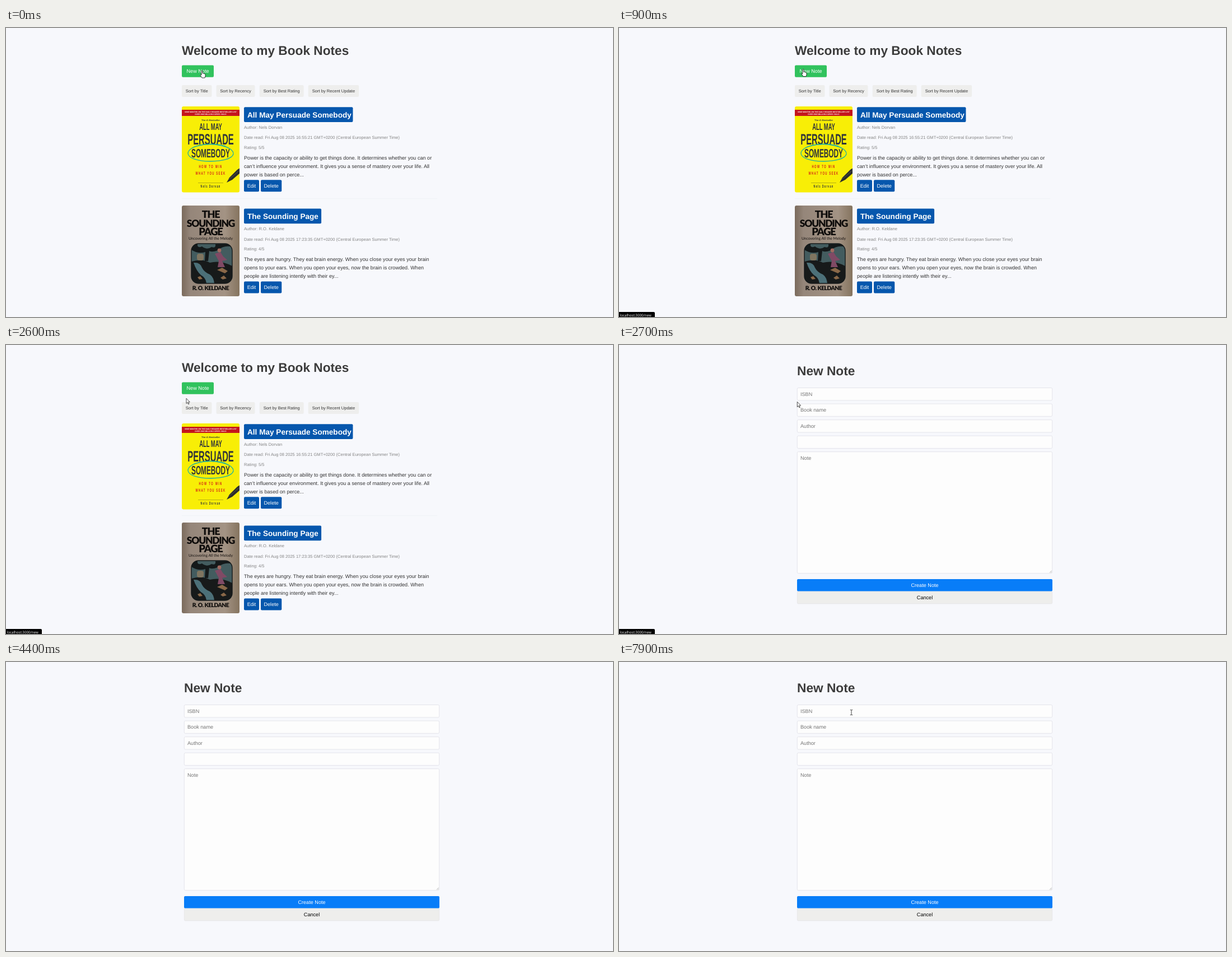
Write an HTML page that moves like this. It is 1084 px wide and 516 px high and loops after 8 s.

```html
<!DOCTYPE html>
<html lang="en">
<head>
<meta charset="utf-8">
<title>Book Notes</title>
<style>
  html, body { margin: 0; width: 100%; height: 100%; overflow: hidden; background: #f7f8fc; }
  svg { display: block; width: 100vw; height: 100vh; }
  text { font-family: "Liberation Sans", Arial, sans-serif; font-size: 9.12px; text-rendering: geometricPrecision; white-space: pre; }
  .heading { font-size: 22.7px; font-weight: 700; fill: #3c3c3c; }
  .title { font-size: 13.6px; font-weight: 700; fill: #fff; }
  .meta { font-size: 7.57px; fill: #858585; }
  .body { fill: #333; }
  .sort { font-size: 7.55px; fill: #333; }
  .light { fill: #fff; }
  .hint { fill: #757575; }
  .status { font: 6.2px "Open Sans", "Noto Sans", sans-serif; fill: #fff; }
  .mid { text-anchor: middle; }
  .tall { font-weight: 700; fill: #30343a; text-anchor: middle; }
  .black { font-family: Lato, Inter, sans-serif; font-weight: 900; fill: #0d0b0a; text-anchor: middle; }
</style>
</head>
<body>
<svg viewBox="0 0 1084 516" preserveAspectRatio="none">
  <defs>
    <linearGradient id="paper">
      <stop offset="0" stop-color="#7b6b5c"/>
      <stop offset=".15" stop-color="#95867a"/>
      <stop offset=".75" stop-color="#a39384"/>
      <stop offset="1" stop-color="#85745f"/>
    </linearGradient>
    <clipPath id="coverA"><rect x="314" y="140" width="103" height="153.5" rx="3"/></clipPath>
    <clipPath id="scene"><rect x="331" y="385" width="73" height="71" rx="13"/></clipPath>
  </defs>
  <rect width="1084" height="516" fill="#f7f8fc"/>
  <g id="home"></g>
  <g id="form"></g>
  <g id="status"></g>
  <g id="cursor">
    <path id="hand" fill="#fff" stroke="#222" stroke-width=".9" stroke-linejoin="round"
      d="M-1 1Q-1 0 0 0T1 1V5Q3 4 3.2 5.5Q4.8 5 5 6.3Q6 6 6 7.5V10L5 13H0L-3 8.5Q-3 7-1 8Z"/>
    <path id="arrow" fill="#fff" stroke="#222" stroke-width=".8" stroke-linejoin="round"
      d="M0 0V9.2L2.1 7.2L3.6 10.4L5 9.9L3.6 6.6H6.3Z"/>
    <path id="beam" fill="none" stroke="#333" stroke-width=".9"
      d="M-2.2-4.5H-.6L0-4L.6-4.5H2.2M0-4V4M-2.2 4.5H-.6L0 4L.6 4.5H2.2"/>
  </g>
</svg>
<script>
const $ = id => document.getElementById(id);
const rect = (x, y, w, h, fill, rx = 2, extra = '') =>
  `<rect x="${x}" y="${y}" width="${w}" height="${h}" rx="${rx}" fill="${fill}" ${extra}/>`;
const text = (x, y, cls, str, style = '') =>
  `<text x="${x}" y="${y}" class="${cls}" style="${style}">${str}</text>`;
const path = (d, fill, stroke = 'none', width = 1) =>
  `<path d="${d}" fill="${fill}" stroke="${stroke}" stroke-width="${width}"/>`;

// Narrow lettering: every line shares one condensed proportion.
const narrow = (y, size, str, fill = '#30343a', spacing = 0) =>
  `<g transform="translate(365.5 ${y}) scale(.55 1)">` +
  text(0, 0, 'tall', str, `font-size:${size}px;fill:${fill};letter-spacing:${spacing}px`) + '</g>';
const heavy = (y, size, str, spacing = -1.2) =>
  text(365.5, y, 'black', str, `font-size:${size}px;letter-spacing:${spacing}px`);

const yellowCover = () => `<g clip-path="url(#coverA)">` +
  rect(314, 140, 103, 154, '#f8ee06', 0) +
  rect(314, 146, 103, 11, '#c4161c', 0) +
  text(365.5, 150.8, 'mid light', 'NINE MONTHS ON THE DAILY READER BESTSELLER LIST', 'font-size:3.3px;font-weight:700') +
  text(365.5, 155, 'mid light', 'OVER ONE MILLION COPIES SOLD!', 'font-size:3.3px;font-weight:700') +
  text(365.5, 166, 'mid', 'The #1 Bestseller', 'font-size:4px;font-weight:700;fill:#30343a') +
  narrow(181.5, 17, 'ALL MAY') +
  narrow(207.5, 27, 'PERSUADE') +
  narrow(231, 21.5, 'SOMEBODY') +
  path('M392 211C360 202 325 211 325 224C326 242 402 243 406 225C407 211 368 203 341 211', 'none', '#1ab0a2', 1.3) +
  narrow(250, 8, 'HOW TO WIN', '#d32118', 2.6) +
  narrow(262, 8, 'WHAT YOU SEEK', '#d32118', 2.4) +
  path('M394 276L399 267L413 253L418 250V259L404 271Z', '#2b2d2c') +
  path('M397 271L416 255', 'none', '#6a6b5c', .6) +
  path('M343 276.5H388', 'none', '#8b861c', .6) +
  narrow(285, 7.4, 'Nels Dorvan', '#30343a', 2) + '</g>';

const tanCover = () => rect(314, 317, 103, 162, 'url(#paper)', 3) +
  heavy(339, 18, 'THE') + heavy(354.5, 17.4, 'SOUNDING') + heavy(369.5, 18.4, 'PAGE') +
  text(365.5, 378, 'mid', 'Uncovering All the Melody', 'font:6.8px Lato,sans-serif;fill:#15110f') +
  '<g clip-path="url(#scene)">' + rect(331, 385, 73, 71, '#435c5f', 0) +
  path('M331 385H342Q341 394 350 390Q359 397 367 391Q375 394 374 386L404 385V391Q390 387 378 397Q368 401 363 398L361 416H355L356 400Q343 404 331 396Z', '#14191a') +
  path('M331 417Q350 411 364 419Q384 414 404 425V456H331Z', '#171a1a') +
  path('M335 419Q347 418 350 428Q354 436 364 440Q371 445 372 456H358Q357 446 348 441Q340 434 335 419Z', '#4c7078') +
  rect(341, 403, 12, 12, '#7f7560', 4) +
  path('M373 403L383 400L388 408L395 414L386 416L391 427H378L380 416Z', '#804a65') +
  '<circle cx="381" cy="397" r="3.4" fill="#a26b61"/>' +
  path('M377 432L386 428L396 434L391 438Z', '#8a6848') +
  path('M342 445l5-2 4 5-6 1zM383 446l6-4 5 5-7 2z', '#8a6848') + '</g>' +
  rect(331, 385, 73, 71, 'none', 13, 'stroke="#14191a" stroke-width="1.4"') +
  heavy(467.8, 10.3, 'R. O. KELDANE', -.5);

function entry(top, title, width, author, date, rating, lines) {
  const button = (x, w, label) => rect(x, top + 130, w, 21, '#0657ad') +
    text(x + w / 2, top + 143.8, 'mid light', label);
  return rect(425, top, 194.5 * width, 26.7, '#0657ad') +
    text(431, top + 18.4, 'title', title) +
    text(425, top + 38.8, 'meta', 'Author: ' + author) +
    text(425, top + 57, 'meta', `Date read: Fri Aug 08 2025 ${date} GMT+0200 (Central European Summer Time)`) +
    text(425, top + 74.6, 'meta', `Rating: ${rating}/5`) +
    lines.map((line, i) => text(425, top + 93.8 + i * 14.85, 'body', line)).join('') +
    button(425, 27, 'Edit') + button(455, 37.3, 'Delete');
}

const sorts = [[314, 53.5, 'Title'], [375.5, 69, 'Recency'], [452.7, 79, 'Best Rating'], [539.7, 90.5, 'Recent Update']];
$('home').innerHTML =
  text(314, 48.3, 'heading', 'Welcome to my Book Notes') +
  rect(314, 66.5, 57, 21.3, '#31c25d') + text(342.5, 80.4, 'mid light', 'New Note') +
  sorts.map(([x, w, by]) => rect(x, 102, w, 21, '#eeeeed') +
    text(x + w / 2, 115.2, 'mid sort', 'Sort by ' + by)).join('') +
  yellowCover() + tanCover() +
  rect(314, 304.5, 456, .6, '#eceef3', 0) +
  entry(141.3, 'All May Persuade Somebody', 1, 'Nels Dorvan', '16:55:21', 5, [
    'Power is the capacity or ability to get things done. It determines whether you can or',
    'can’t influence your environment. It gives you a sense of mastery over your life. All',
    'power is based on perce...']) +
  entry(322.5, 'The Sounding Page', .71, 'R.O. Keldane', '17:23:35', 4, [
    'The eyes are hungry. They eat brain energy. When you close your eyes your brain',
    'opens to your ears. When you open your eyes, now the brain is crowded. When',
    'people are listening intently with their ey...']);

const field = (y, h, hint) =>
  rect(318.3, y + .3, 455.4, h - .6, '#fdfdfd', 2, 'stroke="#dcdce4" stroke-width=".7"') +
  text(324, y + 14.4, 'hint', hint);
$('form').innerHTML =
  text(318, 54.3, 'heading', 'New Note') +
  ['ISBN', 'Book name', 'Author', ''].map((hint, i) => field(76.2 + i * 28.55, 23, hint)).join('') +
  field(190.3, 217.7, 'Note') +
  path('M769 406.5L772.7 402.8M771 406.7L772.7 405', 'none', '#888', .6) +
  rect(318, 418, 456, 21.7, '#087df8') + text(546, 431.7, 'mid light', 'Create Note') +
  rect(318.3, 440, 455.4, 22, '#eeeeec', 2, 'stroke="#dfdfe2" stroke-width=".6"') +
  text(546, 453.8, 'mid', 'Cancel');

$('status').innerHTML = path('M0 507H62Q64 507 64 509V516H0Z', '#000') +
  text(1.8, 514.7, 'status', 'localhost:3000/new');

// Pointer stops: time in ms, x, y.
const stops = [
  [0, 350, 76], [500, 340, 75], [900, 329, 73.5], [1300, 323, 69], [1600, 320, 66],
  [2000, 320, 68], [2300, 321, 76], [2500, 322, 90], [2600, 322, 95.3], [2700, 318.3, 101.5],
  [2900, 260, 118], [3200, -20, 150], [7300, -20, 130], [7400, 262, 114],
  [7600, 335, 99], [7800, 402, 91], [7900, 415, 90]
];
function pointerAt(t) {
  const i = stops.findIndex(s => s[0] > t);
  if (i < 0) return stops[stops.length - 1].slice(1);
  const [a, b] = [stops[i - 1], stops[i]];
  const k = (t - a[0]) / (b[0] - a[0]);
  return [a[1] + (b[1] - a[1]) * k, a[2] + (b[2] - a[2]) * k];
}
const show = (id, on) => { $(id).style.display = on ? '' : 'none'; };
const LOOP = 8000, STEP = 100, FORM_AT = 2700;
const start = performance.now();

function draw(now) {
  const t = Math.floor((Math.max(0, now - start) % LOOP) / STEP) * STEP;
  const [x, y] = pointerAt(t);
  const onForm = t >= FORM_AT;
  const hand = !onForm && y < 88;
  const beam = t > 7000 && x > 318;
  show('home', !onForm);
  show('form', onForm);
  show('status', t >= 300 && t < 3100);
  show('cursor', t < 3200 || t >= 7400);
  show('hand', hand);
  show('beam', beam);
  show('arrow', !hand && !beam);
  $('cursor').setAttribute('transform', `translate(${x} ${y})`);
  requestAnimationFrame(draw);
}
draw(start);
</script>
</body>
</html>
```
